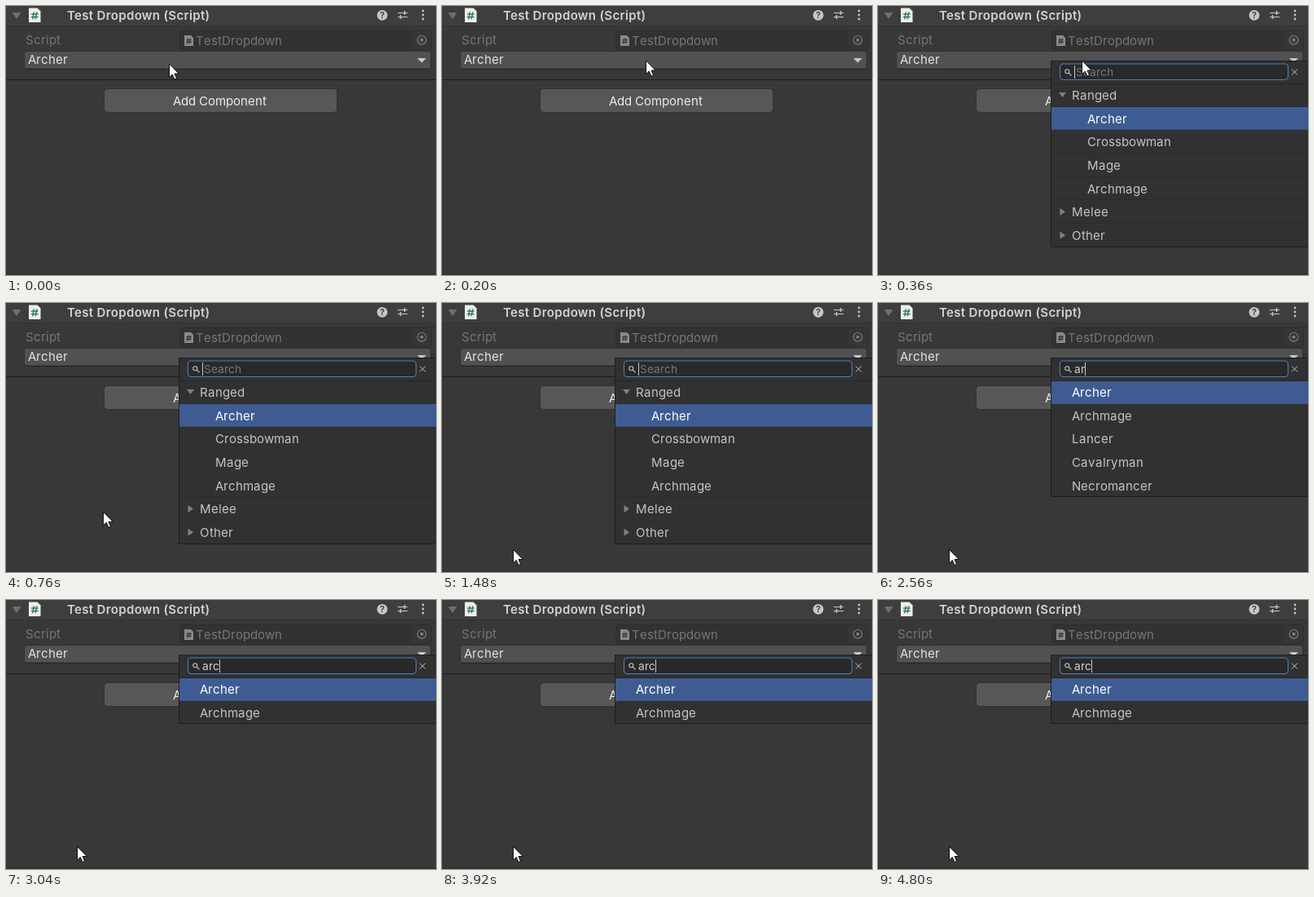
Animation, 528 px wide and 330 px high, one loop 5.92 s. Source, as an HTML page with a canvas:

```html
<!DOCTYPE html>
<html lang="en">
<head>
<meta charset="utf-8">
<title>Searchable dropdown</title>
<style>
  html, body { margin: 0; width: 100%; height: 100%; overflow: hidden; background: #383838; }
  canvas { display: block; }
</style>
</head>
<body>
<canvas id="stage" width="528" height="330"></canvas>
<script>
const g = document.getElementById('stage').getContext('2d');
const LOOP = 5920;
const OPEN = 360;
const ROW = 28.65;
const LIST_TOP = 95;

// Typed query and its results, by start time; '>' marks a folded group, 'v' an open one.
const STATES = [
  { at: OPEN, query: '', selected: 1,
    rows: ['vRanged', ' Archer', ' Crossbowman', ' Mage', ' Archmage', '>Melee', '>Other'] },
  { at: 2440, query: 'a', selected: 0,
    rows: ['Archer', 'Archmage', 'Crossbowman', 'Mage', 'Swordsman', 'Lancer', 'Cavalryman', 'Necromancer'] },
  { at: 2560, query: 'ar', selected: 0,
    rows: ['Archer', 'Archmage', 'Lancer', 'Cavalryman', 'Necromancer'] },
  { at: 2720, query: 'arc', selected: 0, rows: ['Archer', 'Archmage'] }
];

function rect(x, y, w, h, color) {
  g.fillStyle = color;
  g.fillRect(x, y, w, h);
}

function box(x, y, w, h, r, fill, stroke, width = 1) {
  g.beginPath();
  g.roundRect(x, y, w, h, r);
  g.fillStyle = fill;
  g.fill();
  g.lineWidth = width;
  g.strokeStyle = stroke;
  g.stroke();
}

// Hinted text: no kerning, each letter advances by whole pixels. Returns the end position.
function text(s, x, y, color, size = 15) {
  g.font = `${size}px Inter, sans-serif`;
  g.fillStyle = color;
  for (const c of s) {
    g.fillText(c, x, y);
    x += Math.round(g.measureText(c).width + 0.1);
  }
  return x;
}

function bold(s, x, y, color, size, spacing = 0) {
  g.font = `600 ${size}px Inter, sans-serif`;
  g.fillStyle = color;
  g.letterSpacing = spacing + 'px';
  g.fillText(s, x, y);
  g.letterSpacing = '0px';
}

function poly(points, color) {
  g.beginPath();
  points.forEach(([x, y]) => g.lineTo(x, y));
  g.closePath();
  g.fillStyle = color;
  g.fill();
}

function line(x1, y1, x2, y2, color, width) {
  g.beginPath();
  g.moveTo(x1, y1);
  g.lineTo(x2, y2);
  g.lineWidth = width;
  g.strokeStyle = color;
  g.stroke();
}

function circle(x, y, r) {
  g.beginPath();
  g.arc(x, y, r, 0, 7);
}

function dot(x, y, r, color) {
  circle(x, y, r);
  g.fillStyle = color;
  g.fill();
}

function ring(x, y, r, color, width) {
  circle(x, y, r);
  g.lineWidth = width;
  g.strokeStyle = color;
  g.stroke();
}

// Sheet of paper with a cut corner and a hash sign.
function sheet(x, y, w, h, cut, paper, ink) {
  poly([[x, y], [x + w - cut, y], [x + w, y + cut], [x + w, y + h], [x, y + h]], paper);
  const cx = x + w / 2, cy = y + h / 2 + 0.5, r = w * 0.3, d = w * 0.12;
  for (const s of [-d, d]) {
    line(cx + s + d / 2, cy - r, cx + s - d / 2, cy + r, ink, w / 10);
    line(cx - r, cy + s, cx + r, cy + s, ink, w / 10);
  }
}

function drawHeader() {
  rect(0, 0, 528, 24, '#3e3e3e');
  rect(0, 24, 528, 1, '#323232');
  poly([[7.5, 8], [18.5, 8], [13, 16]], '#6f6f6f');
  sheet(28, 2.5, 14.5, 17.5, 4, '#eeeeee', '#2f7d4f');
  bold('Test Dropdown (Script)', 75, 17, '#d4d4d4', 15, 0.34);

  dot(462, 11.3, 6.4, '#c6c6c6');
  bold('?', 458.9, 15.4, '#3a3a3a', 11);

  line(481, 8.5, 493, 8.5, '#c4c4c4', 1.1);
  line(481, 13.5, 493, 13.5, '#c4c4c4', 1.1);
  line(489.5, 6, 489.5, 11, '#c4c4c4', 1.5);
  line(484.5, 11, 484.5, 16, '#c4c4c4', 1.5);

  for (const y of [6, 11, 16]) dot(512, y, 1.4, '#c4c4c4');
}

function drawInspector() {
  rect(0, 0, 528, 330, '#383838');
  drawHeader();

  text('Script', 24, 47, '#767676');
  box(213.5, 30.5, 309, 23, 3, '#323232', '#2d2d2d');
  rect(499, 31, 23, 22, '#363636');
  sheet(219, 36, 11, 13, 3, '#8a8a8a', '#333333');
  text('TestDropdown', 233, 48, '#767676');
  ring(510.5, 41.8, 5.3, '#7d7d7d', 1.2);
  dot(510.5, 41.8, 2, '#7d7d7d');

  box(22.5, 55.5, 499, 21.5, 3, '#515151', '#303030');
  line(24, 77.5, 520, 77.5, '#262626', 1);
  text('Archer', 27, 71, '#e2e2e2');
  poly([[505, 64], [516, 64], [510.5, 69.5]], '#c8c8c8');

  rect(0, 90, 528, 1, '#1c1c1c');

  box(120.5, 101.5, 286, 29, 4, '#575757', '#303030');
  text('Add Component', 205, 122, '#ececec');
  rect(0, 328, 528, 2, '#333333');
}

function drawSearch(query) {
  box(223.5, 71, 280, 19.5, 4, '#292929', '#4680c2', 1.1);
  ring(232.3, 80.2, 2.5, '#c4c4c4', 1.1);
  line(234.2, 82.1, 237.5, 85.4, '#c4c4c4', 1.3);

  if (!query) text('Search', 243, 86, '#777777', 13.75);
  const caret = text(query, 241, 86, '#d2d2d2', 13.75);
  rect(caret, 73, 1, 16, '#c8c8c8');

  line(508, 77.5, 515, 84.5, '#c4c4c4', 1);
  line(515, 77.5, 508, 84.5, '#c4c4c4', 1);
}

function drawRow(row, i, selected) {
  const y = LIST_TOP + i * ROW;
  const top = Math.round(y), end = Math.round(y + ROW);
  const mid = y + ROW / 2;
  const kind = row[0];
  const group = kind === 'v' || kind === '>';

  if (selected) rect(213, top, 315, end - top, '#3f5c92');
  rect(213, end - 1, 315, 1, 'rgba(0, 0, 0, 0.13)');

  if (kind === 'v') poly([[222, 106], [231, 106], [226.5, 112]], '#808080');
  if (kind === '>') poly([[223.5, mid - 4.5], [230, mid], [223.5, mid + 4.5]], '#808080');

  const label = group ? row.slice(1) : row.trim();
  const x = kind === ' ' ? 257 : 238;
  text(label, x, Math.round(mid + 5.6), selected ? '#ffffff' : '#c4c4c4');
}

function drawPopup({ query, rows, selected }) {
  const bottom = Math.round(LIST_TOP + rows.length * ROW);
  rect(212, 67, 316, bottom - 67, '#1e1e1e');
  rect(213, 68, 315, bottom - 69, '#313131');
  drawSearch(query);
  rows.forEach((row, i) => drawRow(row, i, i === selected));
  rect(213, LIST_TOP, 315, 1, '#262626');
  rect(212, bottom - 1, 316, 1, '#1e1e1e');
}

function ease(t, start, end) {
  const k = Math.min(1, Math.max(0, (t - start) / (end - start)));
  return k * k * (3 - 2 * k);
}

function drawPointer(t) {
  const a = ease(t, 0, 200);
  const b = ease(t, OPEN, 920);
  g.save();
  g.translate(200.5 + 50 * a - 163 * b, 71 - 4 * a + 235.5 * b);
  const arrow = [[0, 0], [0, 16.5], [3.8, 13], [6.4, 19], [9, 17.8], [6.5, 12], [11.7, 12]];
  poly(arrow, '#ffffff');
  g.lineWidth = 1;
  g.strokeStyle = '#111111';
  g.stroke();
  g.restore();
}

function frame(now) {
  const t = now % LOOP;
  drawInspector();
  const state = STATES.findLast(s => t >= s.at);
  if (state) drawPopup(state);
  drawPointer(t);
}

const start = performance.now();
function tick() {
  frame(performance.now() - start);
  requestAnimationFrame(tick);
}
tick();
</script>
</body>
</html>
```
